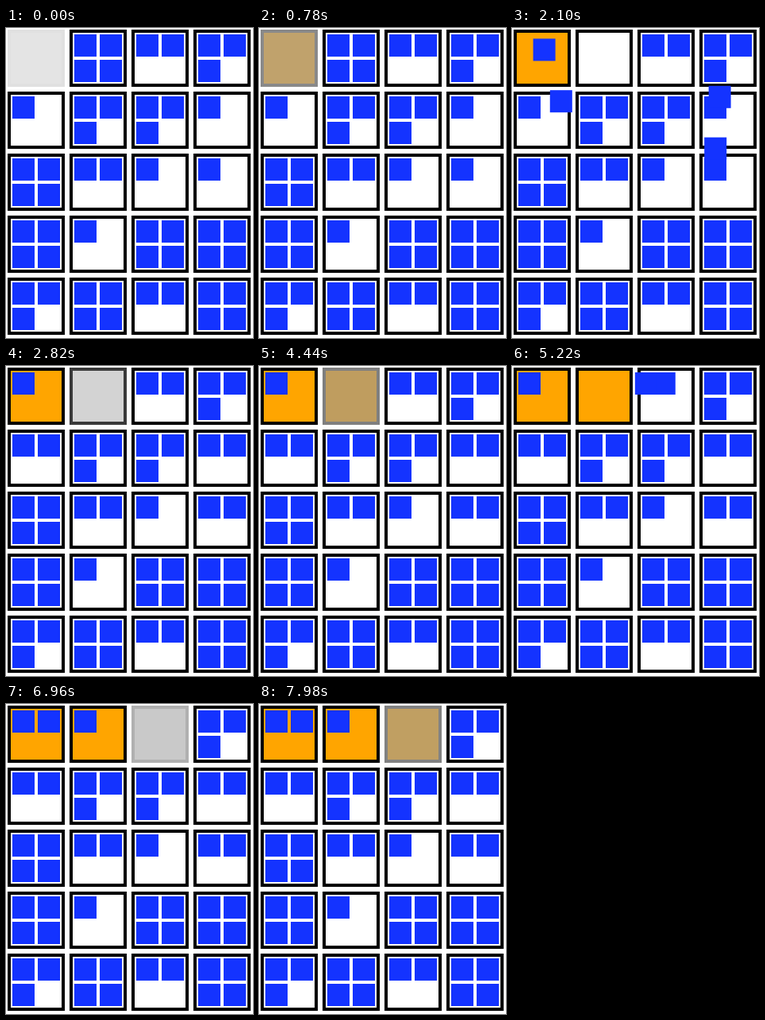
Write an HTML page with a canvas that moves like this. It is 311 by 390 pixels and loops after 8 s.

```html
<!DOCTYPE html>
<html lang="en">
<head>
<meta charset="utf-8">
<title>Sowing blocks</title>
<style>
  html, body { margin: 0; height: 100%; overflow: hidden; background: #fff; }
  canvas { display: block; }
</style>
</head>
<body>
<canvas id="stage" width="311" height="390"></canvas>
<script>
const ctx = document.getElementById('stage').getContext('2d');
const LOOP = 8000, MOVE = 1047;
const BLUE = '#1433ff';
const START_COUNTS = [0, 4, 2, 3, 1, 3, 3, 1, 4, 2, 1, 1, 4, 1, 4, 4, 3, 4, 2, 4];

// Each emptied box hands its last block to the first target, and so on.
const moves = [
  { from: 1, start: 1546, targets: [0, 4, 7, 11] },
  { from: 2, start: 5102, targets: [0, 1] }
];
// Each box blinks out white and returns orange.
const fades = [
  { box: 0, start: -1170, end: 1500 },
  { box: 1, start: 2535, end: 5075 },
  { box: 2, start: 6085, end: 8625 }
];

const boxPos = i => [2 + 78 * (i % 4), 2 + 78 * Math.floor(i / 4)];

function slotPos(box, slot) {
  const [x, y] = boxPos(box);
  return [x + 6 + 32 * (slot % 2), y + 6 + 32 * Math.floor(slot / 2)];
}

// cubic-bezier(.25, .1, .25, 1)
function ease(x) {
  if (x <= 0 || x >= 1) return x <= 0 ? 0 : 1;
  let low = 0, high = 1;
  for (let i = 0; i < 24; i++) {
    const s = (low + high) / 2;
    if (0.75 * s - 0.75 * s * s + s ** 3 < x) low = s; else high = s;
  }
  return 0.3 * low + 2.4 * low * low - 1.7 * low ** 3;
}

function drawBlock([x, y]) {
  ctx.fillStyle = BLUE;
  ctx.fillRect(x, y, 28, 28);
}

function drawBox(i, time) {
  const [x, y] = boxPos(i);
  const fade = fades.find(f => f.box === i);
  let opacity = 1, tint = 0;
  if (fade && time > fade.start) {
    const phase = Math.min(2, 2 * (time - fade.start) / (fade.end - fade.start));
    const back = Math.max(0, phase - 1);
    opacity = Math.abs(1 - phase);
    tint = back * (2 - back);
  }
  ctx.globalAlpha = opacity;
  ctx.fillStyle = '#000';
  ctx.fillRect(x, y, 72, 72);
  ctx.fillStyle = `rgb(255, ${255 - 90 * tint}, ${255 - 255 * tint})`;
  ctx.fillRect(x + 4, y + 4, 64, 64);
  ctx.globalAlpha = 1;
}

function draw(time) {
  ctx.fillStyle = '#fff';
  ctx.fillRect(0, 0, 311, 390);
  const counts = [...START_COUNTS];
  const flying = [], landed = [];

  for (const { from, start, targets } of moves) {
    if (time < start) break;
    const p = ease((time - start) / MOVE);
    for (const target of targets) {
      const [x0, y0] = slotPos(from, --counts[from]);
      const [x1, y1] = slotPos(target, counts[target] + landed.filter(b => b === target).length);
      if (p < 1) {
        flying.push([x0 + (x1 - x0) * p, y0 + (y1 - y0) * p]);
      } else {
        landed.push(target);
      }
    }
  }
  landed.forEach(box => counts[box]++);

  counts.forEach((count, box) => {
    drawBox(box, time);
    for (let slot = 0; slot < count; slot++) drawBlock(slotPos(box, slot));
  });
  flying.forEach(drawBlock);
}

function frame() {
  draw(performance.now() % LOOP);
  requestAnimationFrame(frame);
}
frame();
</script>
</body>
</html>
```
